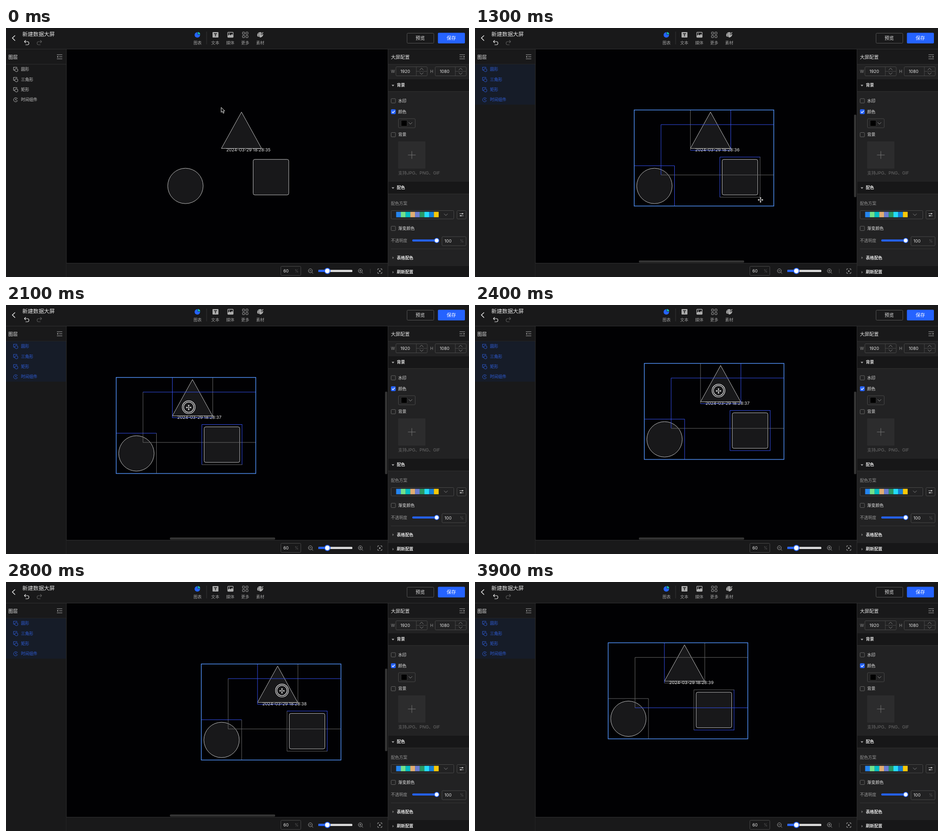
These frames come from a looping animation (1020 px wide and 549 px high, 4 s). An HTML page:

```html
<!DOCTYPE html>
<html lang="zh">
<head>
<meta charset="utf-8">
<style>
html, body { margin: 0; width: 100%; height: 100%; overflow: hidden; background: #000; }
svg { display: block; width: 100vw; height: 100vh; }
text { font-family: Inter, "Noto Sans CJK SC", "Noto Sans CJK", sans-serif; }
</style>
</head>
<body>
<svg id="stage" viewBox="0 0 1020 549"></svg>
<script>
const LIGHT = '#e4e4e4', MUTED = '#949494', DIM = '#5c5c5c', EDGE = '#494949';
const BLUE = '#2563ff', BAR = '#19191a', LINE = '#303031';

// Markup helpers; text is placed by its vertical centre.
const text = (x, y, s, size = 9, fill = LIGHT, extra = '') =>
  `<text x="${x}" y="${y + size * .36}" font-size="${size}" fill="${fill}" ${extra}>${s}</text>`;
const rect = (x, y, w, h, fill = 'none', stroke = 'none', rx = 0, extra = '') =>
  `<rect x="${x}" y="${y}" width="${w}" height="${h}" fill="${fill}" stroke="${stroke}" rx="${rx}" ${extra}/>`;
const path = (d, stroke = LIGHT, width = 1, fill = 'none') =>
  `<path d="${d}" stroke="${stroke}" stroke-width="${width}" fill="${fill}"/>`;
const circle = (x, y, r, fill = 'none', stroke = 'none', width = 1) =>
  `<circle cx="${x}" cy="${y}" r="${r}" fill="${fill}" stroke="${stroke}" stroke-width="${width}"/>`;
const at = (x, y, s) => `<g transform="translate(${x} ${y})">${s}</g>`;
const field = (x, y, w, h = 20) => rect(x + .5, y + .5, w, h, 'none', EDGE, 2);
const chevron = (x, y, up, r = 4) => path(`M${x - r} ${y + up * r / 2}l${r} ${-up * r}l${r} ${up * r}`, '#888');
const centred = 'text-anchor="middle"';

function toolbar() {
  const labels = [['图表', 422], ['文本', 461], ['媒体', 494], ['更多', 527], ['素材', 560]];
  return rect(0, 0, 1020, 46, BAR) + rect(0, 46, 1020, 1, LINE) +
    path('M20 16.5l-6 5.5l6 6', '#eee', 1.5) +
    text(36, 14, '新建数据大屏', 11.9) +
    path('M43.5 27l-3 3l3 3M41 30h6a3 3 0 0 1 0 7h-4', '#e8e8e8', 1.2) +
    path('M75.5 27l3 3l-3 3M78 30h-6a3 3 0 0 0 0 7h4', DIM, 1.2) +
    labels.map(([s, x]) => text(x, 32.5, s, 9, '#a0a0a0', centred)).join('') +
    rect(441.5, 8, 1, 28, '#363636') +
    circle(421.5, 15.2, 6, BLUE) + path('M422.5 14.2V8.5a5.7 5.7 0 0 1 5.7 5.7z', BAR, .8, '#16c5b4') +
    rect(455, 9, 13, 12, '#adadad', 'none', 1) + path('M458 12.5h7M461.5 12.5v6', BAR, 1.6) +
    rect(488.5, 9.5, 12, 11, 'none', '#adadad', 1, 'stroke-width="1.3"') +
    path('M489 20v-3l3-3l3 2l3-3l2 3v4z', 'none', 0, '#adadad') + circle(492, 12.3, 1, '#adadad') +
    [[521, 9], [528.5, 9], [521, 16.5], [528.5, 16.5]]
      .map(([x, y]) => rect(x, y, 4.7, 4.7, 'none', '#adadad', .7)).join('') +
    path('M553.5 16c0-5 5-8 10-6l-3 4l2 2l4-3c1 4-3 8-7 8c-1 0 0-2-2-2c-3 1-4-1-4-3z', 'none', 0, '#adadad') +
    path('M561 15.5l5.5-6', '#adadad', 1.6) + circle(557, 13, .9, BAR) + circle(557, 17, .9, BAR) +
    rect(883.5, 11.5, 59, 22, 'none', '#555', 2) + text(912.5, 22.5, '预览', 10.3, LIGHT, centred) +
    rect(951.5, 10.5, 59.5, 23.5, BLUE, 'none', 2) + text(981, 22.5, '保存', 10.3, '#fff', centred);
}

function layerPanel() {
  const names = ['圆形', '三角形', '矩形', '时间组件'];
  const shapeIcon = '<path d="M3 7H.5V.5H8V3"/><path d="M3.5 4.5L6 3.5L10 5v4L7 10.500L3.500 8.500z"/>';
  const clockIcon = '<path d="M8.500 2A4.500 4.500 0 1 0 9.500 6.500M5 2.500v3h3M7.500 2h2"/>';
  return rect(0, 47, 133, 502, BAR) + rect(0, 79.5, 133, 1, LINE) + rect(132.5, 47, 1, 502, LINE) +
    text(5, 64, '图层', 10.4, LIGHT, 'font-weight="500"') +
    path('M112 59h12M117 63.500h7M112 68h12', '#aaa', 1.2) + path('M115 61.500v4l-3-2z', 'none', 0, '#aaa') +
    rect(0, 80, 132, 89, '#161c28', 'none', 0, 'id="picked"') +
    names.map((s, i) => {
      const y = 91 + i * 22.4;
      return `<g class="layer">${at(16, y - 5, `<g fill="none" stroke="currentColor" stroke-width=".9">${i < 3 ? shapeIcon : clockIcon}</g>`)}` +
        text(33, y, s, 9, 'currentColor') + '</g>';
    }).join('');
}

function configPanel() {
  const header = (y, h, s, open, x = 861) =>
    rect(842, y, 178, h, '#171718') + rect(842, y + h, 178, 1, LINE) + section(y + 13.2, s, open);
  const section = (y, s, open) => text(861, y, s, 9.1, LIGHT, 'font-weight="600"') +
    path(open ? `M849.500 ${y - 1}h6l-3 3.500z` : `M851.500 ${y - 2.500}v5.500l3-2.700z`, 'none', 0, open ? '#aaa' : '#777');
  const check = (y, s, on) => rect(848.5, y - 4.700, 9.5, 9.5, on ? BLUE : 'none', on ? BLUE : '#666', 1) +
    (on ? path(`M850.500 ${y}l2 2.500l4-4.500`, '#fff', 1.3) : '') + text(864, y, s, 9.1);
  const size = (x, label, value, w) => text(x, 95.5, label, 9, MUTED) + field(x + 10.500, 85, w) +
    text(x + 21, 95.7, value, 9.3) + rect(x + w - 13.5, 85, 1, 20, EDGE) +
    rect(x + w - 13.5, 95, 24, 1, EDGE) + chevron(x + w - 1.500, 90.5, 1) + chevron(x + w - 1.500, 100.3, -1);
  const palette = ['#2484ee', '#72e28c', '#00bec4', '#e1ad72', '#6a7dd2', '#299a65', '#24dcfa', '#1580da', '#f9c908'];
  return rect(841, 47, 179, 502, '#222223') + rect(841, 47, 1, 502, LINE) +
    rect(842, 47, 178, 33, BAR) + rect(842, 79.5, 178, 1, LINE) +
    text(848, 64, '大屏配置', 10.3, LIGHT, 'font-weight="500"') +
    path('M999 59h12M999 63.500h7M999 68h12', '#aaa', 1.2) + path('M1008 61.500v4l3-2z', 'none', 0, '#aaa') +
    size(848, 'W', '1920', 69) + size(934.500, 'H', '1080', 68.5) +
    header(113, 26.5, '背景', true) +
    check(160.5, '水印') + check(184.5, '颜色', true) +
    field(864, 199.5, 37, 20) + rect(870.5, 203.5, 13, 13, '#000', '#333') + chevron(891, 210, -1) +
    check(235.2, '背景') + rect(864, 250, 60, 60, '#2c2c2d', 'none', 1) +
    path('M885.500 280h17M894 271.500v17', '#777') +
    text(864, 320, '支持JPG、PNG、GIF', 9.5, '#6b6b6b') +
    header(339, 26.5, '配色', true) +
    text(848, 387, '配色方案', 9, MUTED) + field(848, 402, 138, 18.5) +
    palette.map((c, i) => rect(859.5 + i * 10.4, 405.3, 10.5, 12, c)).join('') +
    chevron(969, 411.5, -1) + field(993, 402, 20, 18.5) +
    path('M999 409.500h9M999 414h9', '#bbb') + circle(1005.5, 409.5, 1.4, '#ccc') + circle(1002, 414, 1.4, '#ccc') +
    check(441.8, '渐变颜色') +
    text(848, 468.5, '不透明度', 9, MUTED) + rect(895, 466.3, 53, 4.4, BLUE, 'none', 2) +
    circle(948.8, 468.5, 5, '#fff', BLUE, 1.5) +
    field(960, 459.5, 53) + text(966, 470, '100', 9.3) + text(1000, 470, '%', 8.5, DIM) +
    rect(848, 486.5, 166, 1, '#363636') + section(506.3, '表格配色', false) +
    header(525, 24, '刷新配置', false);
}

function footer() {
  const lens = (x, plus) => circle(x, 535.3, 4.3, 'none', '#aaa') +
    path(`M${x + 3} 538.300l3 3M${x - 2} 535.300h4${plus ? `M${x} 533.300v4` : ''}`, '#aaa');
  return rect(133, 519, 708, 30, BAR) + rect(133, 518, 708, 1, LINE) +
    field(605, 525, 44) + text(611, 535.7, '60', 9.3) + text(636, 535.7, '%', 8.5, DIM) +
    lens(670.5) + rect(688, 533.3, 75, 4.6, '#dcdcdc', 'none', 1.5) + rect(688, 533.3, 16, 4.6, BLUE, 'none', 1.5) +
    circle(708, 535.6, 6, '#fff', BLUE, 1.8) + lens(780.5, true) + rect(802, 531, 1, 10, '#3a3a3a') +
    path('M819 534v-3h3M825 531h3v3M828 538v3h-3M822 541h-3v-3', '#aaa') + circle(823.5, 536, 1.7, '#aaa');
}

// Guide lines around each item, in the order used by the tint strings below.
const guides = ['M474.500 181v88.500', 'M563.500 181v88.500', 'M474.500 269.500h89',
  'M409.800 213v111', 'M409.800 213h248.500', 'M409.800 324h248.500',
  'M539.500 284.500v88.500', 'M539.500 284.500h89', 'M628 284.500v88.500', 'M539.500 373h89',
  'M351 303.700h88.500', 'M439.500 303.700v88.500'];
const tints = [[0, '011110110011'], [1700, '101010111010'], [2300, '011110111111'],
  [2600, '101010011010'], [3200, '100001001100']];

const items = path('M518.800 185.300L563 265.500H474.500z', '#c4c4c4', 1, '#18181a') +
  rect(544.5, 289.7, 78.4, 78.3, '#18181a', '#c4c4c4', 3.5) + circle(395.3, 348.2, 39, '#18181a', '#c4c4c4') +
  `<g id="frames">${guides.map(d => path(d, '#3550f0')).join('')}` +
  rect(350.7, 180.7, 307.6, 211.8, 'none', '#4f8ef2', 0, 'stroke-width="1.500"') + '</g>' +
  text(534, 268.2, '', 9.6, LIGHT, centred + ' id="clock"');

const arrow = 'M0 0v11l2.600-2.300l1.900 4.300l2-.900l-1.900-4.100h3.500z';
const mover = [0, 90, 180, 270].map(a =>
  `<path d="M-.800 0V-3.500H-2.500L0-6.200L2.500-3.500H.800V0z" transform="rotate(${a})" fill="#fff" stroke="#111" stroke-width=".400"/>`).join('');

const stage = document.getElementById('stage');
stage.innerHTML = rect(133, 47, 708, 472, '#010103') + `<g id="group">${items}</g>` +
  rect(0, 0, 0, 0, 'none', '#4a86e0', 0, 'id="marquee" stroke-width="1.200"') +
  `<g id="scroll">${rect(361, 512.5, 232, 4.8, '#343434', 'none', 2)}${rect(835, 191, 5, 182, '#343434', 'none', 2)}</g>` +
  toolbar() + layerPanel() + configPanel() + footer() +
  `<g id="ring">${circle(0, 0, 14.2, 'none', '#f4f4f4', 1.2)}${circle(0, 0, 11.2, 'none', '#f4f4f4', 1.2)}</g>` +
  `<g id="pointer">${path(arrow, '#eee', 1, '#111')}</g><g id="mover">${mover}</g>`;

const el = id => document.getElementById(id);
const lines = [...el('frames').querySelectorAll('path')];
const layers = document.querySelectorAll('.layer');

// Keys: time, x, y
const cursorKeys = [[0, 474, 175], [100, 440, 165], [400, 269.5, 129.5], [500, 269.5, 129.5], [600, 400, 230],
  [700, 557.5, 341], [800, 651, 380], [900, 661, 393], [1100, 661, 393], [1300, 629, 379], [1600, 511, 247],
  [1700, 511, 247], [1900, 440, 262], [2100, 402.5, 226], [2250, 455, 191], [2400, 536.5, 189.5],
  [2600, 608, 205], [2800, 608, 240], [3100, 510, 266], [3400, 454, 222], [3600, 454, 200]];
const dragKeys = [[1700, 0, 0], [1900, -62, 14], [2100, -108, -21], [2250, -60, -54], [2400, 22.3, -52],
  [2600, 85, -42], [2800, 79.6, 0], [3100, 10, 20], [3400, -55, -20], [3600, -57.3, -46.7]];

function along(keys, t) {
  const i = keys.findIndex(k => k[0] > t);
  if (i < 1) return keys[i < 0 ? keys.length - 1 : 0].slice(1);
  const [a, b] = [keys[i - 1], keys[i]], p = (t - a[0]) / (b[0] - a[0]);
  return [1, 2].map(n => a[n] + (b[n] - a[n]) * p);
}
const show = (id, on) => el(id).style.display = on ? '' : 'none';
const place = (id, [x, y], scale = 1) => el(id).setAttribute('transform', `translate(${x} ${y}) scale(${scale})`);

function draw(t) {
  const cursor = along(cursorKeys, t), picked = t >= 1200, visible = t < 3700;
  const boxing = t >= 500 && t < 1100, dragging = t >= 1700 && t < 3600;
  place('group', along(dragKeys, t));
  el('clock').textContent = `2024-03-29 18:28:${35 + Math.floor((t + 400) / 1000)}`;

  const corner = along(cursorKeys, t - 100), box = el('marquee');
  show('marquee', boxing && t >= 600);
  box.setAttribute('x', 269.5);
  box.setAttribute('y', 129.5);
  box.setAttribute('width', Math.max(0, corner[0] - 269.5));
  box.setAttribute('height', Math.max(0, corner[1] - 129.5));

  show('frames', picked);
  show('picked', picked);
  layers.forEach(l => l.style.color = picked ? '#2f5edb' : '#c8c8c8');
  const tint = tints.filter(k => k[0] <= t).pop()[1];
  lines.forEach((l, i) => l.setAttribute('stroke', +tint[i] ? '#3550f0' : '#686868'));

  show('scroll', t >= 200 && visible);
  show('ring', boxing || dragging);
  place('ring', [cursor[0], cursor[1] + (boxing ? 1.5 : -.7)], boxing ? 1.15 : 1);
  show('pointer', !picked);
  place('pointer', cursor);
  show('mover', picked && visible);
  place('mover', cursor);
}

const start = performance.now();
function tick() {
  draw(Math.floor((performance.now() - start) % 4000 / 100) * 100);
  requestAnimationFrame(tick);
}
tick();
</script>
</body>
</html>
```
